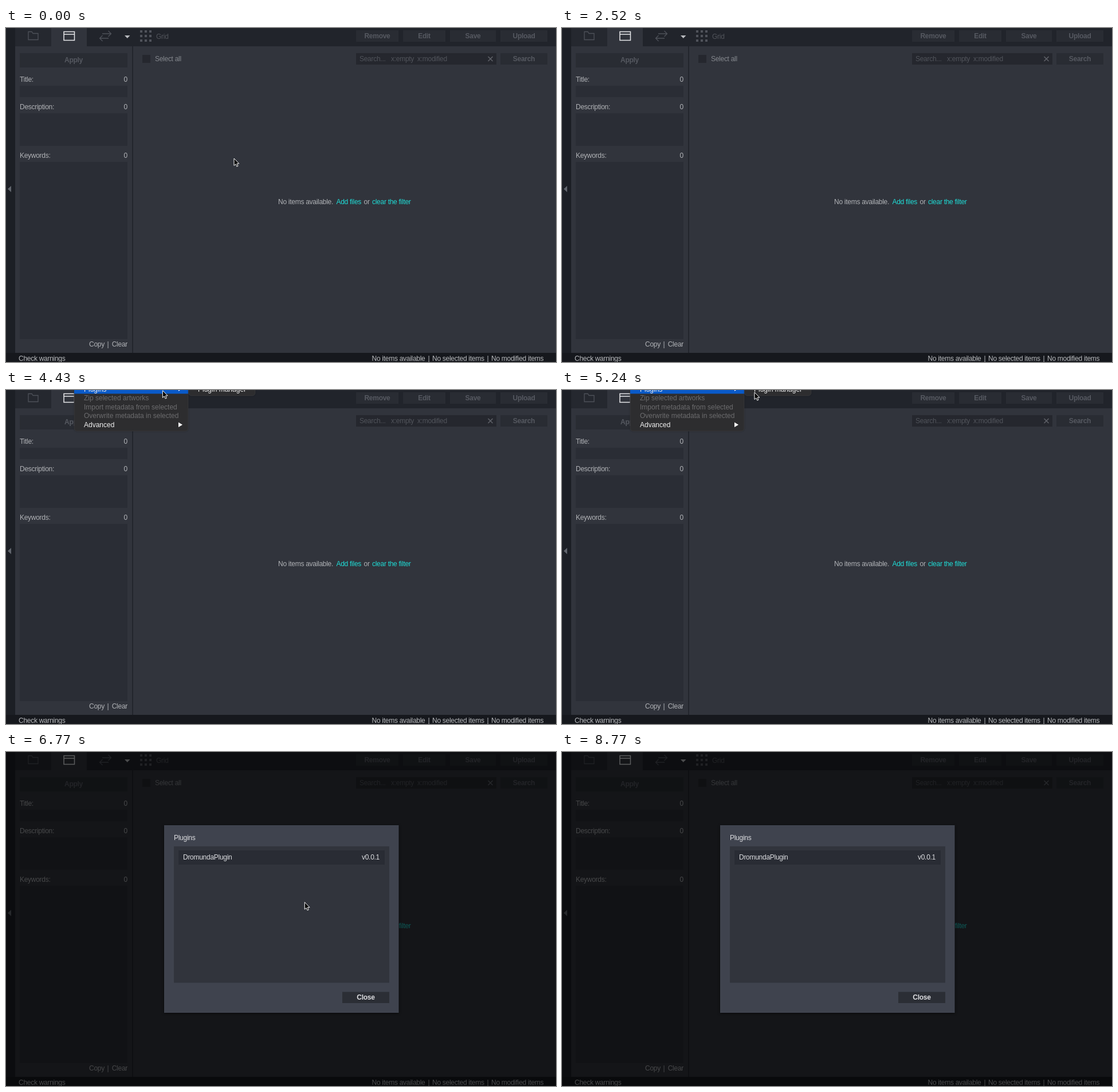
Write an HTML page that moves like this. It is 960 px wide and 584 px high and loops after 9630 ms.

```html
<!DOCTYPE html>
<html lang="en">
<head>
<meta charset="utf-8">
<title>Plugin manager</title>
<style>
html, body { margin: 0; width: 100%; height: 100%; overflow: hidden; background: #31343c; }
svg { display: block; width: 960px; height: 584px; }
text { font: 12px "Liberation Sans", Arial, sans-serif; letter-spacing: -.28px; fill: #b0b2b6; white-space: pre; }
.bold { font-weight: bold; text-anchor: middle; fill: #565961; }
.end { text-anchor: end; }
.link { fill: #1fdcd6; }
.soft { fill: #85888e; }
.faint { fill: #51545b; }
.bright { fill: #dcdde0; }
.status text { fill: #b9bbbe; }
.input { fill: #2a2d35; }
.button { fill: #292c33; }
.icon { fill: none; stroke: #4e5159; stroke-width: 1.3; }
.menu text { letter-spacing: 0; fill: #f2f2f2; }
.menu .off { fill: #6c6c6e; }
.menu .panel { fill: #2d2d2f; stroke: #414245; stroke-width: .6; filter: drop-shadow(0 0 1px #0005); }
.pick { fill: #0a5ac8; }
#dialog .box { filter: drop-shadow(0 1px 2px #000a); }
</style>
</head>
<body>
<svg viewBox="0 0 960 584">
  <rect width="960" height="584" fill="#31343c"/>
  <rect width="16" height="568" fill="#1c1f25"/>
  <path d="M9 276v11l-6-5.500z" fill="#62666e"/>
  <rect x="16" width="63" height="32" fill="#25282f"/>
  <rect x="141" width="819" height="32" fill="#21242b"/>
  <rect x="220" y="32" width="2" height="536" fill="#22252c"/>
  <rect y="568" width="960" height="16" fill="#16181d"/>

  <path class="icon" d="M39 20.500V6.500h6l2 3h9v11z"/>
  <path d="M101 6.500h18.500v15H101zM101 11h18.500" fill="none" stroke="#e8e8ea" stroke-width="1.500"/>
  <path class="icon" d="M168 10h15M178.500 5l5 5-5 5M179 18h-15M168.500 13l-5 5 5 5"/>
  <path d="M207 13h9.500l-4.750 5z" fill="#b9bbbf"/>
  <g id="dots" fill="#50535b"></g>
  <text class="faint" x="262" y="19">Grid</text>

  <g id="buttons"></g>
  <rect x="611" y="44" width="245" height="20" fill="#25272e"/>
  <text class="faint" x="617" y="57.500">Search...</text>
  <text class="faint" x="672" y="57.500">x:empty</text>
  <text class="faint" x="718" y="57.500">x:modified</text>
  <path d="M841.500 50l8 8m0-8l-8 8" stroke="#5f6269" stroke-width="1.600"/>
  <rect x="238" y="47" width="14" height="14" fill="#25272e"/>
  <text class="soft" x="260" y="57.500">Select all</text>

  <g id="fields"></g>
  <text x="145" y="557">Copy</text>
  <text x="176.500" y="557">|</text>
  <text class="end" x="212" y="557">Clear</text>

  <text x="475" y="307.500">No items available.</text>
  <text class="link" x="576.500" y="307.500">Add files</text>
  <text x="624.500" y="307.500">or</text>
  <text class="link" x="639" y="307.500">clear the filter</text>

  <g class="status">
    <text x="22" y="581.500">Check warnings</text>
    <text x="638.500" y="581.500">No items available</text>
    <text x="736.500" y="581.500">|</text>
    <text x="744" y="581.500">No selected items</text>
    <text x="839.500" y="581.500">|</text>
    <text x="847" y="581.500">No modified items</text>
  </g>

  <g id="menu" class="menu">
    <rect class="panel" x="119" y="-12" width="199" height="84" rx="5"/>
    <rect id="pluginsPick" class="pick" x="119" width="199" height="6.500"/>
    <text x="136" y="2.500">Plugins</text>
    <path d="M301-6v8l6-4z" fill="#fff"/>
    <text class="off" x="136" y="18">Zip selected artworks</text>
    <text class="off" x="136" y="33.500">Import metadata from selected</text>
    <text class="off" x="136" y="49">Overwrite metadata in selected</text>
    <text x="136" y="65">Advanced</text>
    <path d="M301 56.500v8.500l7-4.250z" fill="#fff"/>
  </g>
  <g id="submenu" class="menu">
    <rect class="panel" x="318.500" y="-30" width="116.500" height="40" rx="5"/>
    <rect id="managerPick" class="pick" x="319" width="116" height="6"/>
    <text x="335" y="2.500">Plugin manager</text>
  </g>

  <rect id="shade" width="960" height="584"/>
  <g id="dialog">
    <rect class="box" x="276" y="128" width="409.500" height="328" fill="#3f434e"/>
    <text class="bright" x="293" y="154">Plugins</text>
    <rect x="293" y="165" width="376" height="238.500" fill="#31343c"/>
    <rect x="301" y="172" width="360" height="25" fill="#292c34"/>
    <text class="bright" x="309" y="188">DromundaPlugin</text>
    <text class="bright end" x="652" y="188">v0.0.1</text>
    <rect id="closeButton" x="587" y="419.500" width="82" height="19.500"/>
    <text class="bold bright" x="628" y="433">Close</text>
  </g>
  <path id="cursor" d="M0 0V12.500L2.900 9.900 4.800 14.200 6.900 13.300 5 9.100H8.800Z" fill="#000" stroke="#fff"/>
</svg>
<script>
const LOOP = 9630;
const $ = id => document.getElementById(id);

const button = (x, y, w, h, label) =>
  `<rect class="button" x="${x}" y="${y}" width="${w}" height="${h}"/>
   <text class="bold" x="${x + w / 2}" y="${y + h / 2 + 3.5}">${label}</text>`;

const field = (label, y, h) =>
  `<text x="24" y="${y}">${label}:</text><text class="end" x="212" y="${y}">0</text>
   <rect class="input" x="24" y="${y + 7}" width="188" height="${h}"/>`;

$('buttons').innerHTML =
  button(611, 4, 74, 20, 'Remove') + button(693, 4, 74, 20, 'Edit') +
  button(775, 4, 80, 20, 'Save') + button(863, 4, 82, 20, 'Upload') +
  button(863, 44, 82, 20, 'Search') + button(24, 44, 188, 25, 'Apply');
$('fields').innerHTML =
  field('Title', 94, 20) + field('Description', 142, 57) + field('Keywords', 227, 310);
for (let i = 0; i < 9; i++) {
  $('dots').innerHTML +=
    `<rect x="${234 + i % 3 * 8}" y="${4 + Math.floor(i / 3) * 8}" width="4" height="4"/>`;
}

// Pointer moves: first step, last step, number of steps, destination
const moves = [
  [450, 450, 1, 390, 222],
  [660, 1300, 8, 272, 117],
  [1960, 2520, 7, 153, -18],
  [3620, 3620, 1, 155, -7],
  [3710, 3880, 3, 155, -5],
  [4050, 4790, 9, 336, 4],
  [5420, 5710, 4, 425, 188],
  [6390, 6390, 1, 446, 202],
  [6600, 7120, 7, 589, 317],
  [7660, 8180, 7, 655, 428],
  [8360, 8770, 5, 884, 600],
];

const ease = p => p * (1.4 - 0.4 * p);

function pointerAt(t) {
  let x = 398, y = 228;
  for (const [start, end, steps, toX, toY] of moves) {
    if (t < start) break;
    const gap = (end - start) / (steps - 1 || 1) || 1;
    const done = Math.min(steps, Math.floor((t - start) / gap + 0.15) + 1);
    const p = ease(done / steps);
    x += (toX - x) * p;
    y += (toY - y) * p;
  }
  return [x, y];
}

const dialogAlpha = t =>
  t < 5610 ? 0 : t < 5710 ? 0.03 : t < 5820 ? 0.24 : t < 6030 ? 0.8 : 1;

const show = (id, on) => $(id).setAttribute('visibility', on ? 'visible' : 'hidden');

function render(t) {
  const [x, y] = pointerAt(t);
  $('cursor').setAttribute('transform', `translate(${x.toFixed(1)} ${y.toFixed(1)})`);
  show('menu', t >= 3090 && t < 5420);
  show('pluginsPick', t >= 3620 && t < 5420);
  show('submenu', t >= 3880 && t < 5420);
  show('managerPick', t >= 3880 && t < 5420 && x > 319 && !(t >= 5240 && t < 5330));
  // Each part of the dialog fades on its own, so lower layers show through.
  const alpha = dialogAlpha(t);
  $('shade').setAttribute('opacity', 0.6 * alpha);
  for (const part of $('dialog').children) part.setAttribute('opacity', alpha);
  const hover = x > 587 && x < 669 && y > 419 && y < 439;
  $('closeButton').setAttribute('fill', hover ? '#383b44' : '#2b2e35');
}

function tick() {
  render(performance.now() % LOOP);
  requestAnimationFrame(tick);
}
tick();
</script>
</body>
</html>
```
